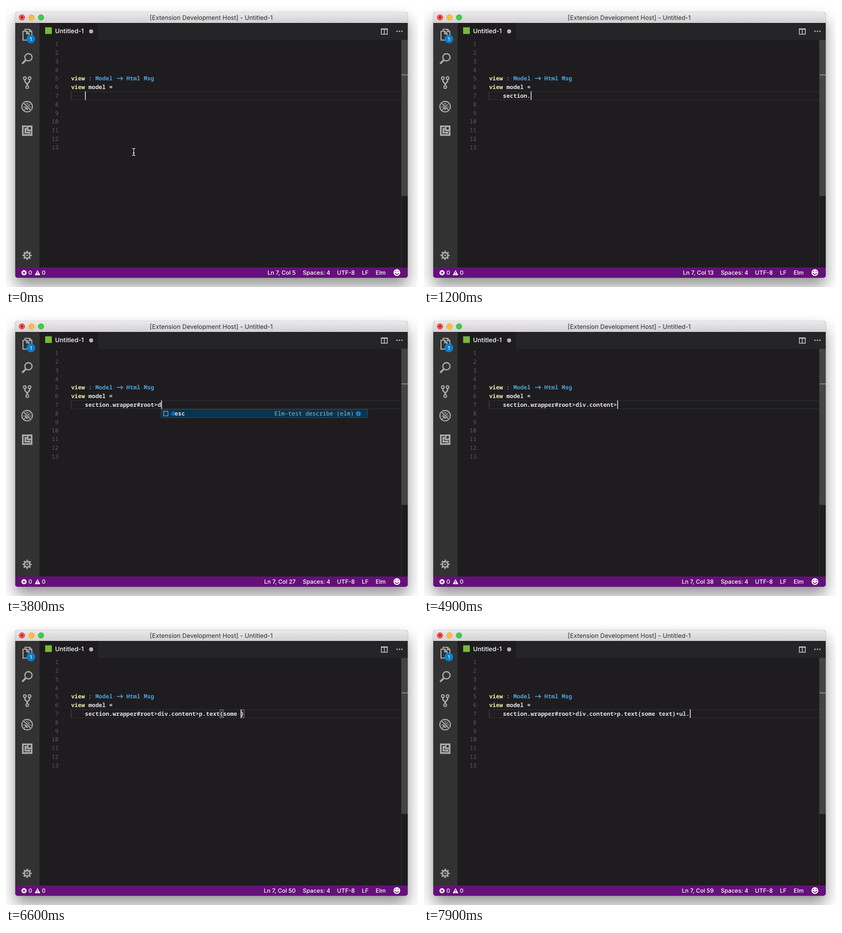
These frames come from a looping animation (800x548 px, 8000 ms). An HTML page:

```html
<!DOCTYPE html>
<html lang="en">
<head>
<meta charset="utf-8">
<title>Editor typing</title>
<style>
  html, body { margin: 0; width: 100%; height: 100%; overflow: hidden; background: #fff; }
  #shadow {
    position: absolute; left: 18px; top: 12px; width: 762px; height: 518px; border-radius: 5px;
    box-shadow: 0 16px 30px rgba(0,0,0,.42), 0 0 2px rgba(0,0,0,.35);
  }
  svg { position: absolute; left: 0; top: 0; display: block; }
  text { font: 500 11.2px Inter, "Open Sans", sans-serif; fill: #fff; white-space: pre; text-rendering: geometricPrecision; }
  .code text, text.code { font: 600 11.2px "Noto Sans Mono", "DejaVu Sans Mono", monospace; fill: #e4e4e4; }
  .code .num { font-weight: 400; fill: #5c5c5e; text-anchor: end; }
  .code .fn { fill: #eeeeaa; }
  .code .type { fill: #4ea1d8; }
  .code .ws { fill: #4a494b; font-weight: 400; }
  .icon { fill: none; stroke: #adadad; stroke-width: 2; }
  .icon .solid { fill: #adadad; stroke: none; }
</style>
</head>
<body>
<div id="shadow"></div>
<svg width="800" height="548" viewBox="0 0 800 548">
  <defs>
    <linearGradient id="bar" x2="0" y2="1">
      <stop stop-color="#ebe9eb"/><stop offset="1" stop-color="#d3d1d3"/>
    </linearGradient>
    <clipPath id="frame"><rect x="18" y="12" width="762" height="518" rx="5"/></clipPath>
  </defs>

  <g clip-path="url(#frame)">
    <rect x="18" y="12" width="762" height="518" fill="#1e1c1f"/>
    <rect x="18" y="12" width="762" height="21" fill="url(#bar)"/>
    <rect x="18" y="33" width="47" height="477" fill="#333233"/>
    <rect x="179" y="33" width="601" height="33" fill="#252426"/>
    <rect x="767" y="66" width="1" height="444" fill="#302f31"/>
    <rect x="768" y="66" width="12" height="304.5" fill="#444345"/>
    <rect x="768" y="133.5" width="12" height="1.8" fill="#8b8b8c"/>
    <rect x="18" y="510" width="762" height="20" fill="#65107a"/>
  </g>

  <!-- title bar -->
  <g stroke-width=".6">
    <circle cx="31" cy="22.3" r="5.6" fill="#f4504f" stroke="#d8413f"/>
    <circle cx="31" cy="22.3" r="1.8" fill="#7b100f"/>
    <circle cx="49.5" cy="22.3" r="5.6" fill="#f8bd3b" stroke="#dba232"/>
    <circle cx="68" cy="22.3" r="5.6" fill="#3fcb4a" stroke="#2fae38"/>
  </g>
  <text x="398.5" y="26.8" text-anchor="middle" style="font-size:12px;font-weight:400;fill:#2e2e2e">[Extension Development Host] - Untitled-1</text>

  <!-- tab and editor actions -->
  <rect x="76" y="41.5" width="13" height="13" fill="#7ab83a"/>
  <text x="95.3" y="53" style="font-size:12.1px">Untitled-1</text>
  <circle cx="165.3" cy="49.5" r="3.9" fill="#b4b4b4"/>
  <g class="icon" style="stroke:#c5c5c5">
    <path d="M728.8 45v10h11.6v-10zM734.6 45v10" stroke-width="1.5"/>
    <path d="M728 45h13.2" stroke-width="2.4"/>
    <path d="M759.2 49.3h.01M764 49.3h.01M768.8 49.3h.01" stroke-width="2.8" stroke-linecap="round"/>
  </g>

  <!-- activity bar -->
  <g class="icon">
    <path d="M37 49v-3.5h9l4.2 4.3v13h-4M45.5 45.5v4.5h4.7M33 49.3h7.5l4.3 4.5v12.6h-11.8zM40 49.3v5h4.8"/>
    <circle cx="48.3" cy="64.3" r="8.4" fill="#0a7fcb" stroke="none"/>
    <circle cx="43.6" cy="100" r="7" stroke-width="2.3"/>
    <path d="M38.4 105.4l-7 7" stroke-width="3.6"/>
    <path d="M36.6 143.5v2.5c0 4 4.6 3.5 4.6 8v1.5M45.8 143.5v2.5c0 4-4.6 3.5-4.6 8" stroke-width="2.6"/>
    <circle cx="36.6" cy="140.7" r="2.6"/><circle cx="45.8" cy="140.7" r="2.6"/><circle cx="41.2" cy="158.2" r="2.6"/>
    <circle cx="41" cy="196.3" r="10.2" stroke-width="2.1"/>
    <ellipse class="solid" cx="41" cy="197.5" rx="3.7" ry="5"/>
    <path d="M38.5 191.5q2.5-3 5 0M33.5 197h15M35 191.5l4 3.5M47 191.5l-4 3.5M35 203l4-4M47 203l-4-4" stroke-width="1.3"/>
    <path d="M34 189l14.5 14.5" stroke="#333233" stroke-width="4"/>
    <path d="M33.6 188.8l15 15"/>
    <path d="M40 234.7h-7.3v17h17v-7.5M42 234.7h7.7v7.6h-7.7z" stroke-width="3.2"/>
    <path d="M37.5 239.5v7.5h7.5" stroke-width="3"/>
    <path class="solid" d="M36 238h4v4h-4zM43 245h4v4h-4z"/>
    <circle cx="41" cy="486.3" r="5.3" stroke-width="2.8"/>
    <circle cx="41" cy="486.3" r="7.7" stroke-width="2.6" stroke-dasharray="3 3.047" stroke-dashoffset="1.5"/>
    <circle class="solid" cx="41" cy="486.3" r="1.7"/>
  </g>
  <text x="48.3" y="67.8" text-anchor="middle" style="font-size:9.6px">1</text>

  <!-- status bar -->
  <circle cx="35" cy="520.3" r="5" fill="#fff"/>
  <path d="M33 518.3l4 4m0-4l-4 4" stroke="#65107a" stroke-width="1.4"/>
  <path d="M61.2 515l5.3 10h-10.6z" fill="#fff"/>
  <path d="M61.2 518.3v3.3m0 1v1.3" stroke="#65107a" stroke-width="1.3"/>
  <text x="43.4" y="524.2">0</text>
  <text x="69.4" y="524.2">0</text>
  <text id="pos" x="562.5" y="524.2" text-anchor="end"></text>
  <text x="576.3" y="524.2">Spaces: 4</text>
  <text x="642.8" y="524.2">UTF-8</text>
  <text x="691" y="524.2">LF</text>
  <text x="717.8" y="524.2">Elm</text>
  <circle cx="759" cy="519.8" r="6.6" fill="#fff"/>
  <path d="M755.2 521q3.8 5 7.6 0" fill="none" stroke="#65107a" stroke-width="1.4"/>
  <path d="M756.6 517.6h.01m4.8 0h.01" stroke="#65107a" stroke-width="2" stroke-linecap="round"/>

  <!-- editor -->
  <path d="M767 167H126.5v15.8H767" fill="none" stroke="#303032"/>
  <rect x="126" y="167" width="1" height="16" fill="#474648"/>
  <g class="code" id="lines"></g>
  <path d="M215.3 141.3h11.2m-3.6-3.3l3.7 3.3-3.7 3.3" fill="none" stroke="#4ea1d8" stroke-width="1.4"/>
  <g id="pair" fill="none" stroke="#8a8a8a">
    <rect id="open" y="167.5" width="6.3" height="15.2"/>
    <rect id="close" y="167.5" width="6.3" height="15.2"/>
  </g>
  <text class="code" id="typed" x="153.3" y="178.9"></text>
  <rect id="caret" y="166.6" width="1.7" height="16.6" fill="#d0d0cf"/>

  <g id="popup" class="code">
    <rect x="301.5" y="184" width="400.5" height="16" fill="#07344f" stroke="#3f4a52"/>
    <rect x="306.2" y="188" width="8.4" height="8.6" fill="none" stroke="#c5c5c5" stroke-width="1.3" stroke-dasharray="2 .9"/>
    <text x="320.5" y="196.3"><tspan fill="#0d9bf5">d</tspan>esc</text>
    <text x="521" y="196.3" style="font-weight:400;fill:#a3b5c0">Elm-test describe (elm)</text>
    <circle cx="684.2" cy="192.5" r="4.8" fill="#1c86bd"/>
    <path d="M684.2 189.6v1.3m0 1v3.4" stroke="#07344f" stroke-width="1.4"/>
  </g>

  <g id="mouse" fill="none" stroke-linecap="round">
    <path id="beam" d="M245.2 277.6q2.8 0 2.8 2v10q0 2-2.8 2m5.6-14q-2.8 0-2.8 2m0 10q0 2 2.8 2M246.3 286.6h3.4" stroke="#111" stroke-width="2.6"/>
    <use href="#beam" style="stroke:#eee"/>
    <path d="M245.2 277.6q2.8 0 2.8 2v10q0 2-2.8 2m5.6-14q-2.8 0-2.8 2m0 10q0 2 2.8 2M246.3 286.6h3.4" stroke="#eee" stroke-width="1.3"/>
  </g>
</svg>

<script>
const LOOP = 8000, STEP = 100;
const CHAR = 6.72, LINE = 16.8, LEFT = 126.4, START = 153.3;
const TEXT = 'section.wrapper#root>div.content>p.text{some text}+ul.';
// Key press times, in steps, one per character of TEXT.
const KEYS = [
  1, 4, 5, 7, 8, 9, 10, 12,
  15, 17, 19, 20, 22, 23, 24,
  26, 28, 29, 31, 32, 34,
  38, 39, 40, 42, 43, 44, 45, 46, 47, 47, 48, 49,
  51, 53, 54, 55, 56, 58, 60,
  63, 64, 65, 65, 66, 67, 68, 69, 70, 72,
  75, 77, 78, 79
];
const OPEN = TEXT.indexOf('{'), CLOSE = TEXT.indexOf('}');

const $ = id => document.getElementById(id);
const show = (id, on) => $(id).setAttribute('visibility', on ? 'visible' : 'hidden');
const setX = (id, x) => $(id).setAttribute('x', x);
const baseline = row => 78.1 + (row - 1) * LINE;
const span = (cls, s) => `<tspan class="${cls}">${s}</tspan>`;
const dots = s => s.replace(/ /g, '\u0000').replace(/>/g, '&gt;').replace(/\u0000/g, span('ws', '·'));
const line = (row, html) => `<text x="${LEFT}" y="${baseline(row)}">${html}</text>`;

let html = '';
for (let n = 1; n <= 13; n++) html += `<text class="num" x="102" y="${baseline(n)}">${n}</text>`;
const dot = span('ws', '·'), gap = '\u00a0\u00a0';
html += line(5, span('fn', 'view') + dot + span('type', ':') + dot + span('type', 'Model') + dot +
  gap + dot + span('type', 'Html') + dot + span('type', 'Msg'));
html += line(6, span('fn', 'view') + dots(' model ='));
html += line(7, dots('    '));
$('lines').innerHTML = html;

let last = -1;
function draw(step) {
  const n = KEYS.filter(k => k <= step).length;
  const inside = n > OPEN && n <= CLOSE;
  $('typed').innerHTML = dots(TEXT.slice(0, n) + (inside ? '}' : ''));
  $('pos').textContent = `Ln 7, Col ${n + 5}`;
  setX('caret', START + n * CHAR);
  setX('open', START + OPEN * CHAR + .3);
  setX('close', START + Math.min(n, CLOSE) * CHAR + .3);
  show('pair', n > OPEN && n <= CLOSE + 1);
  show('popup', step === 38);
  show('mouse', n === 0);
}

function tick() {
  const step = Math.floor(performance.now() % LOOP / STEP);
  if (step !== last) draw(last = step);
  requestAnimationFrame(tick);
}
tick();
</script>
</body>
</html>
```
